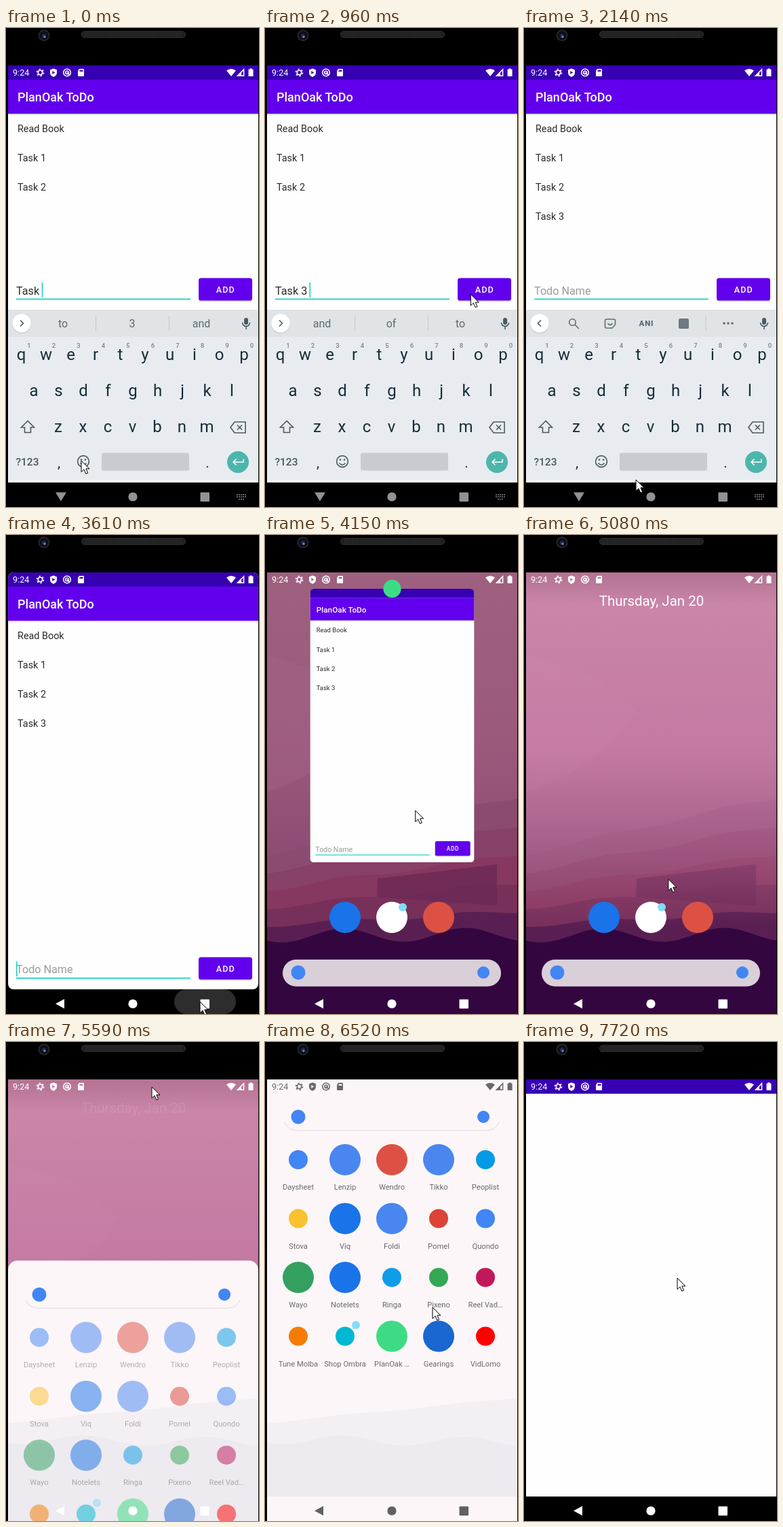
Recreate the animation shown at these times as an HTML page. Size 373 by 704 pixels, loop 7.99 s.

```html
<!DOCTYPE html>
<html lang="en">
<head>
<meta charset="utf-8">
<title>Task list</title>
<style>
html, body { margin: 0; width: 100%; height: 100%; overflow: hidden; background: #000; }
svg { display: block; width: 100%; height: 100%; font-family: Roboto, sans-serif; }
.line { fill: none; stroke: currentColor; stroke-width: 1.6; }
.mid { text-anchor: middle; }
.bold { font-weight: 500; }
</style>
</head>
<body>
<svg id="stage" viewBox="0 0 373 704"></svg>
<script>
// ---- markup helpers ----
const rect = (x, y, w, h, fill, extra = '') =>
  `<rect x="${x}" y="${y}" width="${w}" height="${h}" fill="${fill}" ${extra}/>`;
const disc = (x, y, r, fill, extra = '') => `<circle cx="${x}" cy="${y}" r="${r}" fill="${fill}" ${extra}/>`;
const ring = (x, y, r, extra = '') => `<circle class="line" cx="${x}" cy="${y}" r="${r}" ${extra}/>`;
const path = (d, fill, extra = '') => `<path d="${d}" fill="${fill}" ${extra}/>`;
const line = (d, extra = '') => `<path class="line" d="${d}" ${extra}/>`;
const text = (x, y, size, fill, str, extra = '') =>
  `<text x="${x}" y="${y}" font-size="${size}" fill="${fill}" ${extra}>${str}</text>`;
const label = (x, y, size, fill, str, extra = '') => text(x, y, size, fill, str, `class="mid" ${extra}`);
const strong = (x, y, size, fill, str, extra = '') => text(x, y, size, fill, str, `class="mid bold" ${extra}`);
const group = (id, body, extra = '') => `<g id="${id}" ${extra}>${body}</g>`;
const tinted = (color, body) => `<g color="${color}">${body}</g>`;
const fade = (id, ...stops) => `<linearGradient id="${id}" x2="0" y2="1">` +
  stops.map(([o, c, a = 1]) => `<stop offset="${o}" stop-color="${c}" stop-opacity="${a}"/>`).join('') +
  '</linearGradient>';

// ---- launcher ----
// A sloping layer of land with two soft peaks.
function ridge(left, right, height, fill) {
  let d = 'M3 704';
  for (let x = 3; x <= 372; x += 9) {
    const y = left + (right - left) * x / 372 - height * Math.cos((x - 115) / 180 * 2 * Math.PI);
    d += `L${x} ${y.toFixed(1)}`;
  }
  return path(d + 'V704Z', fill);
}

const wallpaper = () => rect(3, 55, 369, 649, 'url(#sky)') +
  path('M3 178Q90 200 112 215T166 258Q150 285 110 320T3 378Z', '#a7688a', 'opacity=".3"') +
  ['#8b4a70', '#874068', '#873860', '#77305a', '#5a1f52'].map((fill, i) =>
    ridge(470 + 26 * i, 385 + 42 * i, 3, fill)).join('') +
  path('M166 505L342 484V545L165 532Z', '#6c2856', 'opacity=".8"') +
  ridge(589, 587, 10, '#34063f');

const pair = y => disc(49, y, 10.5, '#4285f4') + disc(322, y, 9, '#4285f4');
const notice = (x, y) => disc(x, y, 6, '#82dcf7');

const filled = 'Lenzip Wendro Tikko Viq Foldi Wayo Notelets PlanOak&nbsp;… Gearings'.split(' ');
const apps = {
  'Daysheet': '#4285f4', 'Lenzip': '#4a86f0', 'Wendro': '#dd5144', 'Tikko': '#4a86ee', 'Peoplist': '#039be5',
  'Stova': '#f9c22e', 'Viq': '#1a73e8', 'Foldi': '#4a86f0', 'Pomel': '#db4437', 'Quondo': '#4285f4',
  'Wayo': '#34a060', 'Notelets': '#1a73e8', 'Ringa': '#0f9de8', 'Pixeno': '#34a853', 'Reel Vad…': '#c2185b',
  'Tune Molba': '#f57c00', 'Shop Ombra': '#00b8d4', 'PlanOak&nbsp;…': '#3ddc84', 'Gearings': '#1a67d2', 'VidLomo': '#f00'
};

const appGrid = () => Object.entries(apps).map(([name, fill], i) => {
  const x = 49 + 69 * (i % 5), y = 173 + 86.5 * Math.floor(i / 5);
  return disc(x, y, filled.includes(name) ? 23 : 14, fill) + label(x, y + 44, 11.2, '#6b686b', name);
}).join('') + notice(134, 416);

const home = () => wallpaper() + rect(3, 55, 369, 520, 'url(#glow)', 'id="tint"') +
  group('date', label(188, 104, 20.5, '#fff', 'Thursday, Jan 20')) +
  group('dock',
    ['#1a73e8', '#fff', '#dd5144'].map((fill, i) => disc(118 + 69 * i, 562, 23, fill)).join('') +
    notice(203, 547) + rect(26, 624, 322, 39.5, '#d8cfd9', 'rx="19.7"') + pair(643));

const drawer = () => rect(3, 55, 369, 760, '#fcf6f9', 'id="sheet"') +
  group('hills', ridge(560, 523, 1, '#f4eff3') + ridge(584, 588, 7, '#edeaf0')) +
  rect(3, 668, 369, 36, '#fcf6f9', 'id="shelf"') +
  group('menu',
    path('M29 118a20 20 0 0 0 17 12H328a20 20 0 0 0 17-12', 'none', 'stroke="#e0dade"') +
    pair(110) + group('grid', appGrid()));

// ---- list screen ----
const button = (y, fill, extra = '') => rect(284, y, 79, 33, fill, `rx="3.6" ${extra}`);

const app = () => '<g clip-path="url(#window)">' +
  rect(3, 55, 369, 613, '#fefefe') + rect(3, 55, 369, 21, '#3700b3') +
  rect(3, 126, 369, 2, '#000', 'opacity=".12"') + rect(3, 76, 369, 50, '#6200ee') +
  text(17, 108, 18, '#fff', 'PlanOak ToDo', 'class="bold"') +
  ['Read Book', 'Task 1', 'Task 2', 'Task 3'].map((s, i) =>
    text(17, 153.4 + 43 * i, 14.4, '#2b2b2b', s, `id="item${i}"`)).join('') +
  group('form',
    text(15, 391.5, 16.2, '#9c9c9c', 'Todo Name', 'id="hint"') +
    text(15, 391.5, 16.2, '#2b2b2b', '', 'id="typed"') +
    rect(15, 397.6, 257, 1.8, '#17d3c2') + rect(0, 374, 1.6, 22, '#17d3c2', 'id="caret"') +
    button(369, '#000', 'opacity=".18"') + button(367.5, '#6200ee') +
    button(367.5, '#fff', 'opacity=".25" id="press"') +
    strong(323.8, 388.7, 12.6, '#fff', 'ADD', 'letter-spacing="1.1"')) +
  '</g>' + disc(187.5, 55, 20, '#3ddc84', 'id="badge"');

// ---- keyboard ----
const keyRow = (keys, x, y) => [...keys].map((k, i) => label(x + 36.5 * i, y, 24, '#172d37', k)).join('');
const digits = () => [...'1234567890'].map((n, i) => strong(34 + 36.5 * i, 470, 9.5, '#75838a', n)).join('');
const divider = x => rect(x, 423, 1, 22, '#c3c9cd');

const smallTools = () => ring(71.5, 432.5, 4.8) + line('M75 436l6 6') +
  line('M121.5 428h11q2 0 2 2v6l-4.5 5h-8.5q-2 0-2-2v-9q0-2 2-2zM123.5 434q3.5 5 7 0') +
  label(180.5, 438.3, 11.5, '#5f6e76', 'ANI', 'font-weight="900" letter-spacing=".8"') +
  rect(228, 427, 15, 15, '#6b7981', 'rx="2"') + divider(267.5) +
  [295, 301, 307].map(x => disc(x, 434, 1.8, '#5f6e76')).join('');

const keyboard = () => rect(3, 414, 369, 254, '#e8ecf0') + rect(3, 414, 369, 40, '#e0e4e7') +
  rect(3, 664, 369, 4, '#f3f5f6') +
  disc(23, 435, 14, '#000', 'opacity=".12"') + disc(23, 434, 13.7, '#fff') +
  group('words', divider(132) + divider(240) +
    [0, 1, 2].map(i => label(84 + 102 * i, 440, 16, '#5c6b73', '', `id="word${i}"`)).join('')) +
  group('tools', smallTools(), 'color="#5f6e76"') +
  digits() + keyRow('qwertyuiop', 22.5, 488) + keyRow('asdfghjkl', 41, 541) + keyRow('zxcvbnm', 77, 594) +
  tinted('#4a5961',
    line('M21 429.5l4.5 4.5-4.5 4.5', 'id="chevron"') +
    rect(351, 426, 6, 10, 'currentColor', 'rx="3"') + line('M348.5 433a5.5 5.5 0 0 0 11 0M354 439v4') +
    line('M32 577.5l-9.5 9.5h5v7.5h9v-7.5h5z') +
    line('M331 587l6-8h16v16h-16zM341 583.5l7 7m0-7l-7 7') +
    ring(114, 637, 8.4) + line('M109.5 639.5q4.5 5 9 0') +
    disc(111, 634.5, 1.3, 'currentColor') + disc(117, 634.5, 1.3, 'currentColor')) +
  strong(31.5, 643, 15.5, '#47565e', '?123') +
  label(78, 646, 21, '#172d37', ',') + label(297, 646, 21, '#172d37', '.') +
  rect(141, 624.5, 129, 26, '#c8ccd0', 'rx="2.5"') + disc(342, 638, 16, '#4db6ac') +
  line('M350 633.5v4.5h-15m4.5-4.5l-4.5 4.5 4.5 4.5', 'color="#fff"');

// ---- system bars and device ----
const nav = () => rect(3, 668, 369, 36, '#000', 'id="bar"') +
  rect(0, 668, 91, 36, '#2d2d2d', 'rx="18" id="ripple"') +
  group('keys',
    path('M73 682.5H89L81 695.5Z', 'currentColor', 'id="down"') +
    path('M86 682V696L73 689Z', 'currentColor', 'id="back"') +
    disc(187, 689, 6.6, 'currentColor') + rect(286.5, 682.5, 13.5, 13.5, 'currentColor', 'rx="1"') +
    line('M340 686h14M340 689h14M343 692.5h8', 'stroke-dasharray="1.8 1.2" id="switch"'));

const status = () => text(10, 70, 12.6, 'currentColor', '9:24') +
  ring(50.5, 65.5, 3.2) + ring(50.5, 65.5, 5, 'stroke-dasharray="2.4 2.836"') +
  path('M70 59.5l5 2v4q0 4.5-5 6.5-5-2-5-6.5v-4zM68.3 63v5l4-2.5z', 'currentColor', 'fill-rule="evenodd"') +
  ring(90, 65.5, 5.3) + ring(90, 65.5, 2.2) + line('M90 65.5l4 4') +
  path('M108 60h6q1 0 1 1v9q0 1-1 1h-7q-1 0-1-1v-7zM108.5 62v2h5v-2z', 'currentColor', 'fill-rule="evenodd"') +
  path('M325 62.5Q332 57.5 339 62.5L332 71Z', 'currentColor') +
  line('M350.5 61v9.3H341.5Z') + path('M347 64.5V70.5H341Z', 'currentColor') +
  path('M359.5 59.5h3v1.3h2v10.2h-7V60.8h2z', 'currentColor');

const device = () => disc(56, 11, 8.5, '#252527') + disc(56, 11, 6.5, '#0d0e18') +
  disc(56, 11.5, 3, '#1f2c58') + disc(57, 13, 1.5, '#7f95d8') +
  rect(111.5, 5, 153, 9, '#1e1e1e', 'rx="4.5" stroke="#3a3a3a"') +
  path('M116 8h144M116 11h144', 'none', 'stroke="#363636" stroke-width="1.5" stroke-dasharray="1.5"');

document.getElementById('stage').innerHTML = '<defs>' +
  fade('sky', [0, '#9f607f'], [.4, '#9a597b'], [.7, '#8b4872'], [1, '#5a2050']) +
  fade('glow', [0, '#c07f9f'], [.09, '#e79fc4'], [.5, '#e08fbd'], [1, '#e08fbd', 0]) +
  `<clipPath id="screen">${rect(3, 55, 369, 649, '#000')}</clipPath>` +
  `<clipPath id="window">${rect(3, 55, 369, 613, '#000', 'id="corner"')}</clipPath></defs>` +
  rect(0, 0, 373, 704, '#000') + '<g clip-path="url(#screen)">' +
  group('home', home()) + group('drawer', drawer()) + group('app', app()) +
  group('splash', rect(3, 55, 369, 613, '#fefefe') + rect(3, 55, 369, 21, '#3700b3')) +
  group('keyboard', keyboard()) + group('nav', nav()) + group('status', status()) + '</g>' + device() +
  group('pointer', path('M0 0V16.5L4 12.8 6.8 19.2 9.6 18 6.9 11.8H12Z', '#fff', 'stroke="#000"'));

// ---- timing ----
const LOOP = 7990, STEP = 127.5;
const scenes = [0, 120, 1240, 2290, 3490, 4570, 5710, 6760];

const PICK = 540, ADD = 1240, HIDE = 2530, RECENT = 3610, LIFT = 4200, GONE = 4690;
const PULL = 5170, DROP = 5590, OPEN = 6760, FULL = 7330;

// Where the pointer arrives, and when.
const stops = [[0, 111, 636], [PICK, 186, 435], [960, 326, 383], [2140, 165, 664], [HIDE, 82, 685],
  [RECENT, 286, 686], [LIFT, 216, 380], [GONE, 217, 115], [PULL, 212, 590], [DROP, 215, 66],
  [6475, 247, 390], [OPEN, 190, 432], [7600, 226, 347]];

function span(t, from, to) {
  const k = Math.min(1, Math.max(0, (t - from) / (to - from)));
  return k * k * (3 - 2 * k);
}
const mix = (a, b, k) => a + (b - a) * k;
const during = (t, from, to) => t >= from && t < to;

// The pointer rests for a third of each interval before it leaves.
function pointerAt(t) {
  const n = stops.findIndex(s => s[0] > t);
  if (n < 0) return stops[stops.length - 1].slice(1);
  const [t0, x0, y0] = stops[n - 1], [t1, x1, y1] = stops[n];
  const k = span(t, mix(t0, t1, .3), t1);
  return [mix(x0, x1, k), mix(y0, y1, k)];
}

const el = {};
document.querySelectorAll('[id]').forEach(e => el[e.id] = e);
const set = (id, name, v) => el[id].setAttribute(name, v);
const show = (id, on) => el[id].style.display = on ? '' : 'none';
const move = (id, x, y) => set(id, 'transform', `translate(${x} ${y})`);
const place = (id, s, cy) => set(id, 'transform', `translate(${187.5 * (1 - s)} ${cy - s * 361.5}) scale(${s})`);

function drawForm(t) {
  const picked = t >= PICK, added = t >= ADD + 120;
  show('item3', added);
  show('hint', added);
  el.typed.textContent = added ? '' : picked ? 'Task 3' : 'Task';
  set('caret', 'x', added ? 15 : picked ? 65.5 : 52.7);
  const edited = added ? ADD + 120 : picked ? PICK : 0;
  show('caret', (t - edited) % 1000 < 500);
  show('press', during(t, ADD, ADD + 240));
  move('form', 0, t >= HIDE + 120 ? 253 : 0);
  show('words', !added);
  show('tools', added);
  (picked ? ['and', 'of', 'to'] : ['to', '3', 'and']).forEach((w, i) => el['word' + i].textContent = w);
  set('chevron', 'transform', added ? 'rotate(180 23 434)' : '');
  show('keyboard', t < HIDE + 390);
  move('keyboard', 0, 254 * span(t, HIDE, HIDE + 390));
}

// The card shrinks, then follows the pointer off the top.
function drawCard(t, y) {
  const k = span(t, RECENT, LIFT - 100), lift = t > LIFT ? 1.8 * (380 - y) : 0;
  show('app', t < GONE);
  place('app', mix(1, .656, k), mix(361.5, 280, k) - lift);
  set('corner', 'rx', k > 0 ? 8 : 0);
  show('badge', k > .5);
}

// The drawer follows the pointer half way, then opens by itself.
function drawLauncher(t, y) {
  const p = t < PULL ? 0 : t < DROP ? .51 * (590 - y) / 524 : mix(.51, 1, span(t, DROP, DROP + 360));
  const off = 533 * (1 - p), open = p === 1;
  show('home', during(t, RECENT + 100, FULL));
  set('tint', 'opacity', .6 * span(t, GONE, GONE + 240));
  set('date', 'opacity', Math.max(.1, 1 - 2 * p) * span(t, GONE, GONE + 240));
  move('dock', 0, off - 533);
  set('dock', 'opacity', Math.max(0, 1 - 4 * p));
  show('drawer', p > 0 && t < FULL);
  set('sheet', 'y', 55 + off * 1.019);
  set('sheet', 'rx', Math.min(14, off / 4));
  set('sheet', 'opacity', Math.min(1, p * 4));
  show('hills', p > .3);
  show('shelf', open);
  move('menu', 0, off);
  set('grid', 'opacity', p);
}

function drawBars(t) {
  const typing = t < HIDE + 120, dark = during(t, DROP + 240, FULL);
  const onBack = during(t, HIDE, HIDE + 240);
  show('bar', t < RECENT + 100 || t >= FULL);
  show('down', typing);
  show('back', !typing);
  show('switch', typing);
  set('keys', 'color', typing ? '#929292' : dark ? '#626062' : '#fff');
  show('ripple', onBack || during(t, RECENT, RECENT + 100));
  set('ripple', 'x', onBack ? 36 : 248);
  set('status', 'color', dark ? '#6b686b' : '#fff');
}

function draw(t) {
  const [x, y] = pointerAt(t), grown = span(t, OPEN + 120, FULL);
  move('pointer', x, y);
  drawForm(t);
  drawCard(t, y);
  drawLauncher(t, y);
  drawBars(t);
  show('splash', grown > 0);
  place('splash', mix(.1, 1, grown), mix(432, 361.5, grown));
}

// The picture is held between steps, counted afresh in every scene.
function frame() {
  const now = performance.now() % LOOP;
  const start = scenes.filter(s => s <= now).pop();
  draw(start + STEP * Math.floor((now - start + 8) / STEP));
  requestAnimationFrame(frame);
}
frame();
</script>
</body>
</html>
```
